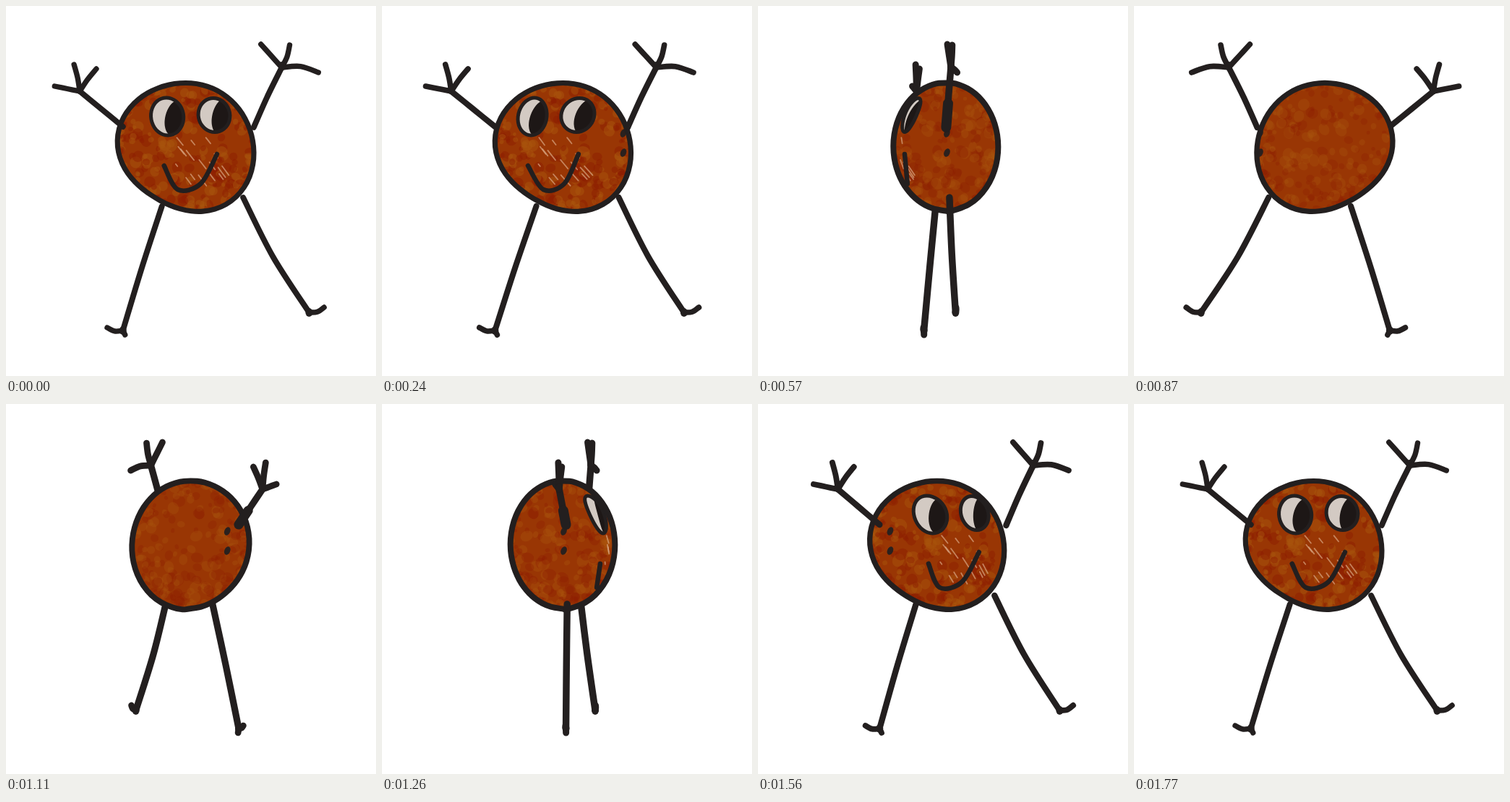
Recreate the animation shown at these times as an HTML page with a canvas. Size 512x512 px, loop 1.8 s.

```html
<!DOCTYPE html>
<html lang="en">
<head>
<meta charset="utf-8">
<title>Spinning doodle</title>
<style>
html, body { margin: 0; width: 100%; height: 100%; overflow: hidden; background: #fff; }
canvas { display: block; width: 100vw; height: 100vh; }
</style>
</head>
<body>
<canvas id="stage" width="512" height="512"></canvas>
<script>
const ctx = document.getElementById('stage').getContext('2d');
const INK = '#231f1f', MID = 256, CY = 194.5, TAU = Math.PI * 2;
const STEP = 30, COUNT = 60;

// tips: x, y and how far the stroke bows
const LIMBS = [
  { side: -1, arm: true, root: [160, 167], joint: [100, 118], bow: 0,
    tips: [[65, 111, 0], [92, 81, 1], [123, 87, -1]] },
  { side: 1, arm: true, root: [342, 168], joint: [381, 85], bow: -1,
    tips: [[352, 53, 0], [392, 54, 2], [432, 92, -5]] },
  { side: -1, root: [215, 277], joint: [160, 449], bow: 1, tips: [[138, 445, -3], [163, 455, 0]] },
  { side: 1, root: [328, 265], joint: [419, 424], bow: 5, tips: [[440, 417, 3]] }
];
const MOUTH = [[217, 221], [237, 254], [268, 246], [290, 205]];

let seed = 71;
function rnd() {
  seed = (seed * 16807) % 2147483647;
  return seed / 2147483647;
}

const blots = Array.from({ length: 480 }, (_, i) => {
  const y = rnd() * 2 - 1, a = rnd() * TAU, k = Math.sqrt(1 - y * y);
  return { x: 93 * k * Math.cos(a), y: CY + 88 * y, z: 71 * k * Math.sin(a),
    r: 3 + rnd() * 7, tilt: rnd() * 3, color: i % 2 ? '#8c1d00' : '#a9560d' };
});
const scratches = Array.from({ length: 17 }, () => {
  const x = 232 + rnd() * 70, y = 172 + rnd() * 66, n = 3 + rnd() * 12;
  return [[x, y], [x + n * 0.8, y + n]];
});

// one eased turn with a slight drift in its pace
function turnAt(u) {
  const deg = 180 * (1 - Math.cos(Math.PI * u)) - 7.5 + 5 * Math.cos(TAU * (u - 0.2));
  return deg * TAU / 360;
}

// smooth path through points
function trace(pts, closed) {
  const n = pts.length;
  const at = i => closed ? pts[(i + n) % n] : pts[Math.max(0, Math.min(n - 1, i))];
  ctx.beginPath();
  ctx.moveTo(pts[0][0], pts[0][1]);
  for (let i = 0; i < (closed ? n : n - 1); i++) {
    const a = at(i - 1), b = at(i), c = at(i + 1), d = at(i + 2);
    ctx.bezierCurveTo(b[0] + (c[0] - a[0]) / 6, b[1] + (c[1] - a[1]) / 6,
      c[0] - (d[0] - b[0]) / 6, c[1] - (d[1] - b[1]) / 6, c[0], c[1]);
  }
  if (closed) ctx.closePath();
}

function stroke(width, color = INK) {
  ctx.lineWidth = width;
  ctx.strokeStyle = color;
  ctx.stroke();
}

function line(pts, width, color) {
  trace(pts, false);
  stroke(width, color);
}

function blob(x, y, rx, ry, tilt, color) {
  ctx.beginPath();
  ctx.ellipse(x, y, rx, ry, tilt, 0, TAU);
  ctx.fillStyle = color;
  ctx.fill();
}

const mix = (a, b, k) => [a[0] + (b[0] - a[0]) * k, a[1] + (b[1] - a[1]) * k];

function bowed(a, b, bow) {
  const [x, y] = mix(a, b, 0.5), len = Math.hypot(b[0] - a[0], b[1] - a[1]) || 1;
  return [a, [x - (b[1] - a[1]) / len * bow, y + (b[0] - a[0]) / len * bow], b];
}

function draw(step) {
  const turn = turnAt(step / (COUNT - 1));
  const c = Math.cos(turn), s = Math.sin(turn), edge = Math.abs(s);
  const reach = step % (COUNT - 1) ? 1.037 : 1; // limbs relax at rest
  const flat = (x, z) => MID + x * c - z * s;
  const depth = (x, z) => x * s + z * c;
  const core = flat(-7, -5);

  function drawLimb(limb) {
    const place = ([x, y], z) => [flat((x - MID) * reach, z) + 2 * (1 - c), y];
    const root = place(limb.root, limb.arm ? 12 : 5), joint = place(limb.joint, 12);
    const width = 7.7 + 1.8 * edge;
    line(bowed(root, joint, limb.bow * c), width);
    for (const tip of limb.tips) {
      let end = place(tip, 12);
      if (!limb.arm) end = [mix(joint, end, Math.abs(c))[0], end[1]];
      line(bowed(joint, end, tip[2] * c), width - 0.5);
    }
    blob(joint[0], joint[1] - (limb.arm ? 2 : 0), 5, 6, 0, INK);
    if (limb.arm && limb.side * s > 0.4) line([root, mix(root, joint, 0.4)], 8 + 6 * edge);
  }

  // front features follow the bulge of the body
  function onFace([x, y]) {
    const X = x - MID - 4;
    const z = 62 * Math.sqrt(Math.max(0, 1 - (X / 100) ** 2 - ((y - CY) / 92) ** 2));
    return [flat(X, z), y, depth(X, z)];
  }
  const seen = p => p[2] > 14;

  function oval(x, y, rx, ry, tilt = 0) {
    const pts = [], ct = Math.cos(tilt), st = Math.sin(tilt);
    for (let a = 0; a < TAU - 0.01; a += TAU / 20) {
      const p = rx * Math.cos(a), q = ry * Math.sin(a);
      pts.push(onFace([x + p * ct - q * st, y + p * st + q * ct]));
    }
    trace(pts, true);
  }

  function eye(x, y, rx, ry) {
    if (!seen(onFace([x, y]))) return;
    oval(x, y, rx, ry);
    ctx.fillStyle = '#d3cac3';
    ctx.fill();
    ctx.save();
    ctx.clip();
    oval(x + 11, y + 2, 14, 25, 0.28);
    ctx.fillStyle = '#1d1716';
    ctx.fill();
    ctx.restore();
    oval(x, y, rx, ry);
    stroke(5);
  }

  // lopsided round, squeezed as it turns
  const shell = Array.from({ length: 36 }, (_, i) => {
    const t = (i + 0.5) * TAU / 36;
    const r = 91 + 3 * Math.cos(2 * t) + 4.5 * Math.sin(2 * t) * (1 + Math.sin(t));
    const q = r * Math.cos(t) * c, y = r * Math.sin(t);
    const g = 71 * edge * Math.sqrt(Math.max(0, 1 - (y / 88.5) ** 2));
    return [core + Math.sign(q) * (Math.abs(q) ** 1.8 + g ** 1.8) ** (1 / 1.8), CY + y];
  });

  ctx.fillStyle = '#fff';
  ctx.fillRect(0, 0, 512, 512);
  ctx.lineCap = ctx.lineJoin = 'round';
  LIMBS.filter(l => l.side * s <= 0).forEach(drawLimb);

  trace(shell, true);
  ctx.fillStyle = '#993604';
  ctx.fill();
  ctx.save();
  ctx.clip();

  ctx.globalAlpha = 0.32 + 0.15 * Math.max(0, c);
  for (const b of blots) {
    const d = depth(b.x, b.z);
    if (d > 0) blob(core + b.x * c - b.z * s, b.y, b.r * (0.4 + 0.6 * Math.min(1, d / 70)), b.r * 0.8, b.tilt, b.color);
  }
  ctx.globalAlpha = 0.7;
  for (const mark of scratches) {
    const pts = mark.map(onFace);
    if (pts.every(seen)) line(pts, 1.8, '#d9a582');
  }
  ctx.globalAlpha = 1;

  // ink stains on both flanks
  if (edge > 0.2) {
    for (const x of [-82, 82]) {
      for (const y of [176, 203]) {
        if (depth(x, 8) > 0) blob(flat(x, 8), y, 4, 6, 0.4, '#2a211e');
      }
    }
  }
  eye(222, 153, 22, 26);
  eye(287, 151, 22.5, 23.5);
  const mouth = MOUTH.map(onFace).filter(seen);
  if (mouth.length > 1) line(mouth, 6.5);
  ctx.restore();

  trace(shell, true);
  stroke(7 + edge);
  LIMBS.filter(l => l.side * s > 0).forEach(drawLimb);
}

const start = performance.now();
function tick(now) {
  draw(Math.floor(Math.max(0, now - start) / STEP) % COUNT);
  requestAnimationFrame(tick);
}
draw(0);
requestAnimationFrame(tick);
</script>
</body>
</html>
```
